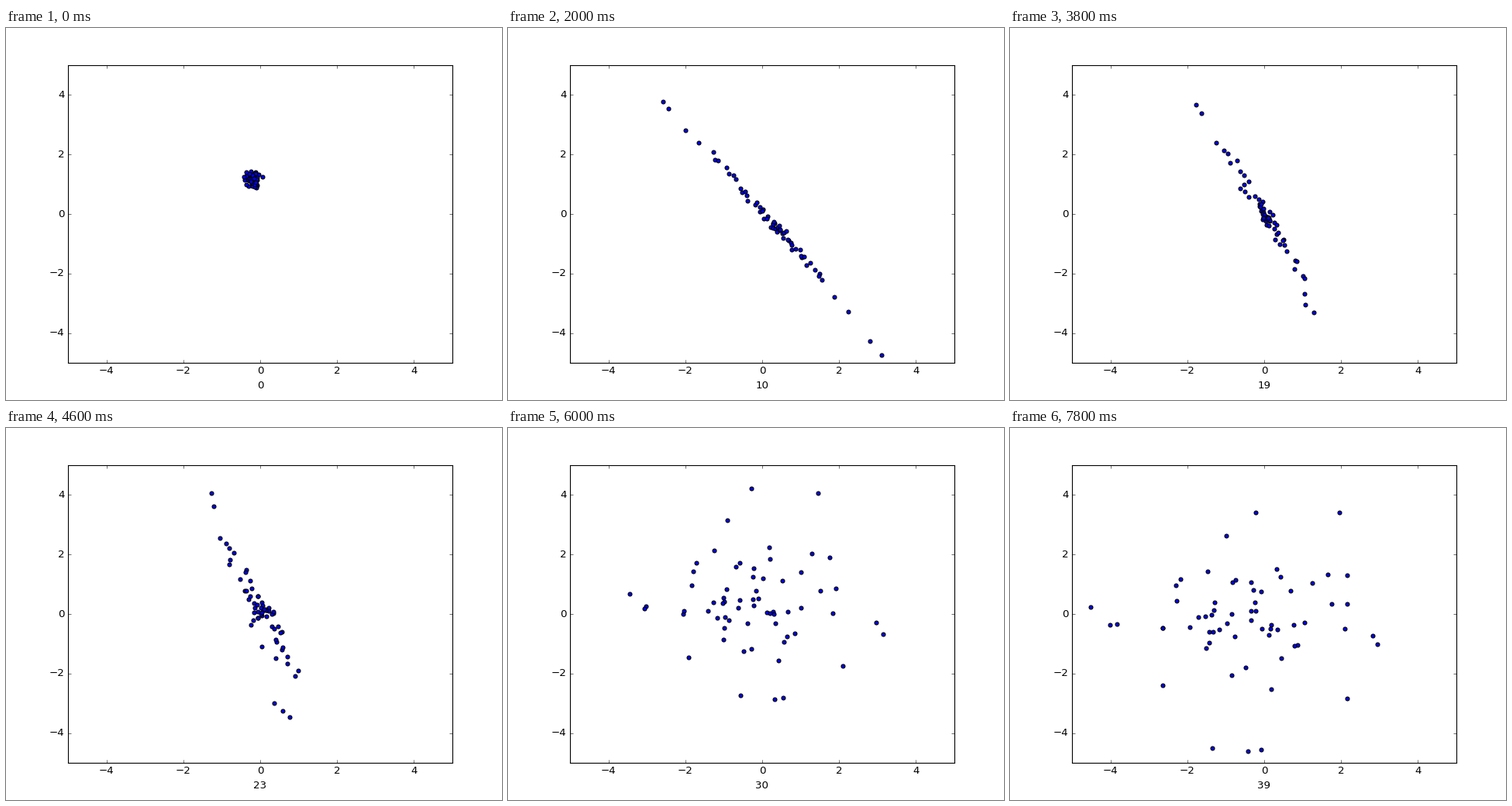
A matplotlib script that plays this animation: 640 by 480 pixels, repeating every 8 s.

```python
import numpy as np
import matplotlib.pyplot as plt
from matplotlib.animation import FuncAnimation

plt.style.use("classic")
plt.rcParams.update({"savefig.dpi": "figure", "font.family": "DejaVu Sans"})

FRAMES, STEP_MS = 40, 200
N = 64
CENTER = np.array([328, 240])      # pixel position of the data point (0, 0)
UNIT = np.array([49.6, -38.4])     # pixels per data unit
rng = np.random.default_rng(12)


def scattered(count, middle, spread, limit=3):
    """Seeded normal dots around a pixel position."""
    noise = np.clip(rng.normal(size=(count, 2)), -limit, limit)
    return middle + noise * spread


def strand(top, middle, bottom, jitter, power=2.5):
    """A chain of dots, dense in the middle, that thins out to its two tips."""
    top, middle, bottom = map(np.array, (top, middle, bottom))
    count = N - len(top) - len(bottom)
    u = np.linspace(-1, 1, count + 2)[1:-1, None]
    end = np.where(u < 0, top[-1], bottom[0])
    body = middle + np.abs(u) ** power * (end - middle)
    body = scattered(count, body, jitter, 1.8)
    return np.vstack([top, body, bottom]) - CENTER


def wide_cloud():
    """A loose cloud with a few far dots, ordered from top to bottom."""
    far = [(107, 215), (132, 238), (141, 237), (506, 252), (517, 263),
           (320, 93), (428, 93), (282, 123), (293, 335), (341, 337), (357, 336)]
    near = scattered(N - len(far), (323, 230), (65, 38), 1.9)
    dots = np.vstack([far, near]) - CENTER
    return dots[np.argsort(dots[:, 1], kind="stable")]


def sink(dots):
    """Let the cloud sag, the lowest dots the most, and draw in its right side."""
    x, y = dots.T
    return np.column_stack([
        x - 3 - 0.45 * np.maximum(0, x - 100) - 0.9 * np.maximum(0, y - 63),
        y + 16 + 0.95 * np.maximum(0, y - 30)])


def mid(a, b, scale=1, shift=(0, 0)):
    return (a + b) / 2 * scale + np.array(shift)


clump = scattered(N, (318, 195), 5) - CENTER
diagonal = strand([(169, 83), (177, 95), (195, 111), (208, 121), (234, 142)],
                  (323, 237),
                  [(387, 302), (418, 325), (440, 350), (469, 379)],
                  jitter=3, power=1.5)
steeper = strand([(231, 117), (236, 121), (258, 154), (275, 173)],
                 (338, 250),
                 [(384, 312), (409, 347), (410, 359), (438, 401), (436, 405)],
                 jitter=3.5)
steep = strand([(240, 99), (247, 110), (266, 148), (276, 158)],
               (331, 242),
               [(380, 323), (380, 343), (381, 357), (392, 367)],
               jitter=4)
upright = strand([(297, 113), (296, 131), (297, 168), (302, 172)],
                 (332, 246),
                 [(366, 318), (327, 357), (342, 363), (349, 368)],
                 jitter=(14, 6))
cloud = wide_cloud()

# Poses by frame number, with the swings between the main ones.
poses = {
    0: clump,
    4: diagonal * 0.95 + (45, 23),
    6: diagonal,
    10: mid(diagonal, steeper, 1.12, (15, 12)),
    14: steeper,
    16: mid(steeper, steep, 1.3, (-25, -12)),
    19: steep,
    22: mid(steep, upright, 1.15, (-5, -12)),
    26: upright,
    28: mid(upright, cloud, (1, 1.2), (0, -12)),
    32: cloud * (1.1, 1),
    34: cloud,
    39: sink(cloud),
}
times = np.array(list(poses))
shapes = np.array(list(poses.values())) / UNIT


def dots_at(frame):
    k = min(np.searchsorted(times, frame, side="right"), len(times) - 1)
    t = (frame - times[k - 1]) / (times[k] - times[k - 1])
    return shapes[k - 1] * (1 - t) + shapes[k] * t


fig, ax = plt.subplots(figsize=(8, 6), dpi=80, facecolor="white")
ax.set(xlim=(-5, 5), ylim=(-5, 5),
       xticks=range(-4, 5, 2), yticks=range(-4, 5, 2))
scatter = ax.scatter(*dots_at(0).T, s=20, c="b", edgecolors="k", linewidths=1)
label = ax.set_xlabel("0")


def draw(frame):
    scatter.set_offsets(dots_at(frame))
    label.set_text(str(frame))
    return scatter, label


anim = FuncAnimation(fig, draw, frames=FRAMES, interval=STEP_MS,
                     repeat=True, repeat_delay=0, blit=False)
plt.show()
```
